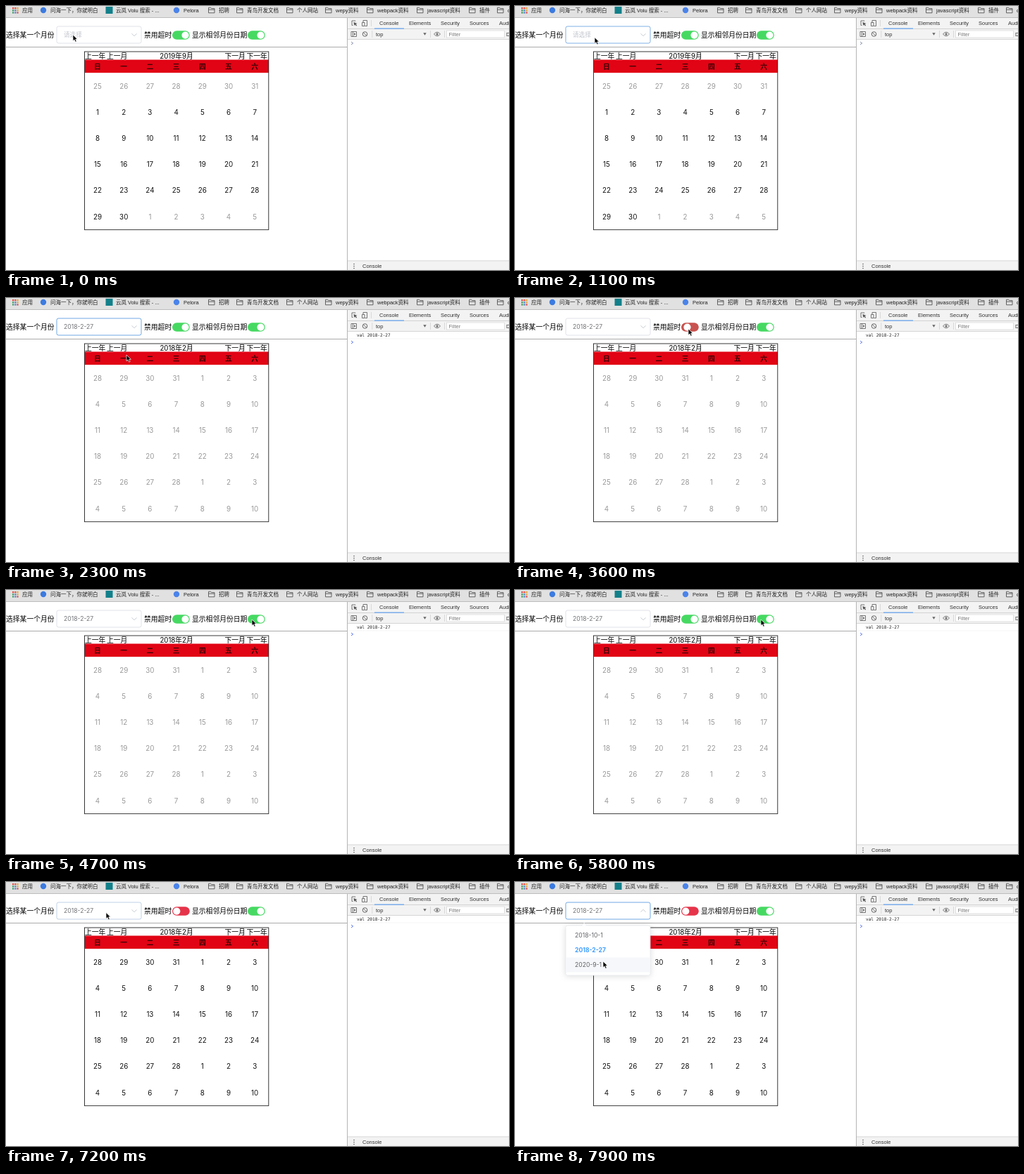
An HTML page that plays this animation: 714 by 376 pixels, repeating every 8 s.

```html
<!DOCTYPE html>
<html lang="zh-CN">
<head>
<meta charset="utf-8">
<title>Calendar demo</title>
<style>
html, body { margin: 0; width: 100%; height: 100%; overflow: hidden; background: #fff; }
svg { display: block; width: 714px; height: 376px; }
text { font-family: Inter, "Noto Sans CJK SC", "Noto Sans CJK", sans-serif; white-space: pre; }
.ui { font-family: "Liberation Sans", "Noto Sans CJK SC", "Noto Sans CJK", sans-serif; }
.mono { font-family: "DejaVu Sans Mono", monospace; }
</style>
</head>
<body>
<svg viewBox="0 0 714 376">
  <g id="chrome"></g>
  <g id="scene"></g>
</svg>
<script>
const LOOP = 8000, GREEN = [70, 217, 98], RED = [230, 52, 74];
const MONTHS = {
  sep: { title: '2019年9月', lead: 7, prev: 31, days: 30 },
  feb: { title: '2018年2月', lead: 4, prev: 31, days: 28 }
};
const OPTIONS = ['2018-10-1', '2018-2-27', '2020-9-1'];

// Click times
const OPEN1 = 1050, PICK = 1950, OFF1 = 3050, ON1 = 3520;
const HIDE = 4720, SHOW = 5250, OFF2 = 6500, OPEN2 = 7130;

// Pointer keys: time, x, y
const POINTER = [
  [0, 95, 41], [400, 98, 42], [950, 113, 44], [1200, 113, 45], [1700, 116, 94],
  [2000, 116, 95], [2300, 171, 81], [2600, 200, 66], [2980, 246, 44], [3800, 246, 44],
  [4500, 349, 42], [5850, 349, 42], [6350, 246, 43], [6650, 246, 43], [7080, 142, 43],
  [7300, 142, 44], [7800, 125, 113], [8000, 125, 113]
];

const ease = p => p * p * (3 - 2 * p);
const ramp = (t, start, length = 300) => ease(Math.min(1, Math.max(0, (t - start) / length)));
const mix = (a, b, p) => a + (b - a) * p;
const blend = (a, b, p) => `rgb(${a.map((v, i) => Math.round(mix(v, b[i], p)))})`;

// Text is placed by its vertical centre
const text = (x, y, s, size, fill = '#000', more = '') =>
  `<text x="${x}" y="${y + size * .365}" font-size="${size}" fill="${fill}" ${more}>${s}</text>`;
const centred = (x, y, s, size, fill, more = '') => text(x, y, s, size, fill, `text-anchor="middle" ${more}`);
const ui = (x, y, s, fill = '#333', size = 7.5) => text(x, y, s, size, fill, 'class="ui"');
const rect = (x, y, w, h, fill, more = '') =>
  `<rect x="${x}" y="${y}" width="${w}" height="${h}" fill="${fill}" ${more}/>`;
const path = (d, stroke, width = 1, more = '') =>
  `<path d="${d}" fill="none" stroke="${stroke}" stroke-width="${width}" ${more}/>`;
const circle = (x, y, r, fill, more = '') => `<circle cx="${x}" cy="${y}" r="${r}" fill="${fill}" ${more}/>`;

function bookmarks() {
  const dots = ['#e0483e', '#e0483e', '#e5a52c', '#3f9d58', '#4a7fd8', '#e5a52c', '#3f9d58', '#4a7fd8', '#e0483e'];
  const folders = [[287, '招聘'], [327, '青鸟开发文档'], [398, '个人网站'], [453, 'wepy资料'],
    [512, 'webpack资料'], [583, 'javascript资料'], [657, '插件'], [697, 'c']];
  return rect(0, 0, 714, 16.5, '#e1e1e1') + rect(0, 16, 714, 1, '#bdbdbd') +
    dots.map((c, i) => rect(9 + i % 3 * 3.2, 2 + Math.floor(i / 3) * 3.2, 2.2, 2.2, c)).join('') +
    ui(23, 6, '应用', '#222') +
    circle(53, 6, 4.2, '#3c7be0') + ui(63, 6, '问海一下，你就明白', '#222') +
    rect(141.5, 1, 10, 10, '#12808a') + ui(156, 6, '云岚 Volu 搜索 - ...', '#222') +
    circle(242, 6, 4.2, '#4a83ea') + ui(252, 6, 'Pelora', '#222') +
    folders.map(([x, s]) =>
      path(`M${x + .5} 9.8V2.3h3.2l1 1.3h4.3v6.2zM${x + .5} 5.2h8.5`, '#555', .9) + ui(x + 15, 6, s, '#222')).join('');
}

function devtools() {
  const tabs = [[530, 'Console'], [572, 'Elements'], [617, 'Security'], [658, 'Sources'], [700, 'Audits']];
  return rect(484, 17, 230, 359, '#fff') + rect(485, 17, 229, 30.5, '#f3f3f3') +
    rect(484, 17, 1, 359, '#b5b5b5') +
    rect(485, 32, 229, .8, '#ccc') + rect(485, 47, 229, .8, '#ccc') +
    path('M496 21.5v-.5h-5v6.5h1.5', '#666', .9) + '<path d="M493.5 23l5 2-2 .8 1.6 2-1 .7-1.6-2-1.2 1.5z" fill="#555"/>' +
    path('M507 23v-2.5h5.5v8h-3M505.500 23.500h3.500v5h-3.500z', '#666', .9) +
    rect(518, 20, .7, 9, '#ccc') +
    tabs.map(([x, s]) => ui(x, 24, s)).join('') + rect(523, 31.5, 42, 1.3, '#6aa5ee') +
    path('M490 36.500h7.500v7h-7.500zM492.500 36.500v7', '#666', .9) + '<path d="M494 38l2.500 2-2.500 2z" fill="#666"/>' +
    circle(509.5, 40, 3.3, 'none', 'stroke="#666"') + path('M507.2 37.700l4.600 4.600', '#666') +
    rect(519.5, 35, .7, 10, '#ccc') + ui(525, 40, 'top') + '<path d="M592.300 38.300h4.400l-2.200 3.500z" fill="#666"/>' +
    rect(602, 35, .7, 10, '#ccc') +
    path('M607.500 40q4.500-5.500 9 0q-4.500 5.500-9 0z', '#666', .9) + circle(612, 40, 1.5, '#666') +
    rect(622, 35, .7, 10, '#ccc') +
    rect(625.5, 35, 82, 10, '#fff', 'stroke="#d5d5d5" stroke-width=".7"') + ui(628.5, 40, 'Filter', '#777') +
    ui(710, 40, 'Default') +
    rect(485, 363, 229, 13, '#f3f3f3') + rect(485, 362.5, 229, .8, '#ccc') +
    [367.5, 370.5, 373.5].map(y => circle(494, y, .8, '#555')).join('') + ui(506, 370, 'Console');
}

function calendar(month, faded, hidden) {
  const rows = hidden ? 5 : 6, { title, lead, prev, days } = month;
  let out = centred(242, 71, title, 9.7);
  [[112, '上一年'], [143, '上一月'], [310.5, '下一月'], [341.500, '下一年']]
    .forEach(([x, s]) => out += text(x, 71, s, 9.8));
  out += rect(112, 76.5, 261, 18.6, '#e10414');
  [...'日一二三四五六'].forEach((s, i) => out += centred(130 + 37.2 * i, 86, s, 9.8, '#3a0206', 'font-weight="700"'));
  for (let i = 0; i < rows * 7; i++) {
    const n = i - lead + 1, outside = n < 1 || n > days;
    if (outside && hidden) continue;
    const label = n < 1 ? n + prev : n > days ? n - days : n;
    const grey = faded && (month === MONTHS.feb || outside);
    out += centred(130 + 37.2 * (i % 7), 114 + 37.2 * Math.floor(i / 7), label, 9.8, grey ? '#999' : '#111');
  }
  return out + rect(111.5, 65, 261.3, 253.7 - (6 - rows) * 37.2, 'none', 'stroke="#222" stroke-width=".9"');
}

const toggle = (x, on) => rect(x, 35.3, 24.8, 12.5, blend(RED, GREEN, on), 'rx="6.25"') +
  circle(x + mix(6.3, 18.5, on), 41.55, 5.1, '#fff');

function select(value, focus, open) {
  return rect(72, 29, 120, 24, '#fff', `rx="2.5" stroke="${blend([220, 223, 230], [94, 157, 226], focus)}" stroke-width=".9"`) +
    text(82, 41, value || '请选择', 8.6, value ? '#707276' : '#c0c4cc') +
    path('M178.500 39.300l3.500 3.500l3.500-3.500', '#c0c4cc', .9, `transform="rotate(${180 * open} 182 41)"`);
}

function dropdown(open, value, y) {
  if (!open) return '';
  const items = OPTIONS.map((s, i) => {
    const cy = 76 + 21 * i, hover = Math.abs(y + 5 - cy) < 10.5, chosen = s === value;
    return (hover ? rect(72.4, cy - 10.5, 119.2, 21, '#f5f7fa') : '') +
      text(85, cy, s, 8.6, chosen ? '#409eff' : '#606266', chosen ? 'font-weight="700"' : '');
  }).join('');
  return `<g opacity="${open}" transform="translate(0 ${62 * (1 - open)}) scale(1 ${open})">` +
    rect(72, 62, 120, 71, '#fff', 'rx="2.5" stroke="#e4e7ed" stroke-width=".7" style="filter:drop-shadow(0 1px 4px #0002)"') +
    `<path d="M94.500 62.400l3.700-4l3.700 4z" fill="#fff"/>` + path('M94.500 62l3.700-4l3.700 4', '#e4e7ed', .7) +
    items + '</g>';
}

function log(value) {
  const y = value ? 63 : 53;
  return (value ? text(498, 53, 'val ' + value, 6.1, '#222', 'class="mono"') + rect(485, 57.7, 229, .6, '#eee') : '') +
    path(`M490 ${y - 1.9}l2.700 1.900l-2.700 1.900`, value ? '#4a68e8' : '#7880a0', .9);
}

function pointer(t) {
  const k = POINTER.findIndex(p => p[0] > t), a = POINTER[k - 1], b = POINTER[k];
  const p = ease((t - a[0]) / (b[0] - a[0]));
  return [mix(a[1], b[1], p), mix(a[2], b[2], p)];
}

function scene(t) {
  const [x, y] = pointer(t), picked = t >= PICK, value = picked ? OPTIONS[1] : '';
  const limit = ramp(t, ON1) + 1 - ramp(t, OFF1) - ramp(t, OFF2);
  const faded = t < OFF1 || t >= ON1 && t < OFF2;
  const adjacent = 1 - ramp(t, HIDE) + ramp(t, SHOW);
  const focus = ramp(t, OPEN1 - 100, 200) - ramp(t, OFF1, 200) + ramp(t, OPEN2, 200);
  const open = ramp(t, OPEN1 + 80) - ramp(t, PICK, 250) + ramp(t, OPEN2 + 80);
  return rect(0, 58, 484, 1, '#aaa') +
    text(0, 41, '选择某一个月份', 9.8) + select(value, focus, open) +
    text(196, 41, '禁用超时', 9.8) + toggle(236, limit) +
    text(264, 41, '显示相邻月份日期', 9.8) + toggle(343, adjacent) +
    calendar(picked ? MONTHS.feb : MONTHS.sep, faded, t >= HIDE && t < SHOW) +
    dropdown(open, value, y) + log(value) +
    `<path transform="translate(${x} ${y})" d="M0 0v8.800l2-1.900l1.500 3.300l1.700-.7l-1.500-3.200h2.700z" fill="#000" stroke="#fff" stroke-width=".7"/>`;
}

const byId = id => document.getElementById(id);
byId('chrome').innerHTML = bookmarks() + devtools();
const start = performance.now();
function draw() {
  byId('scene').innerHTML = scene((performance.now() - start) % LOOP);
  requestAnimationFrame(draw);
}
draw();
</script>
</body>
</html>
```
